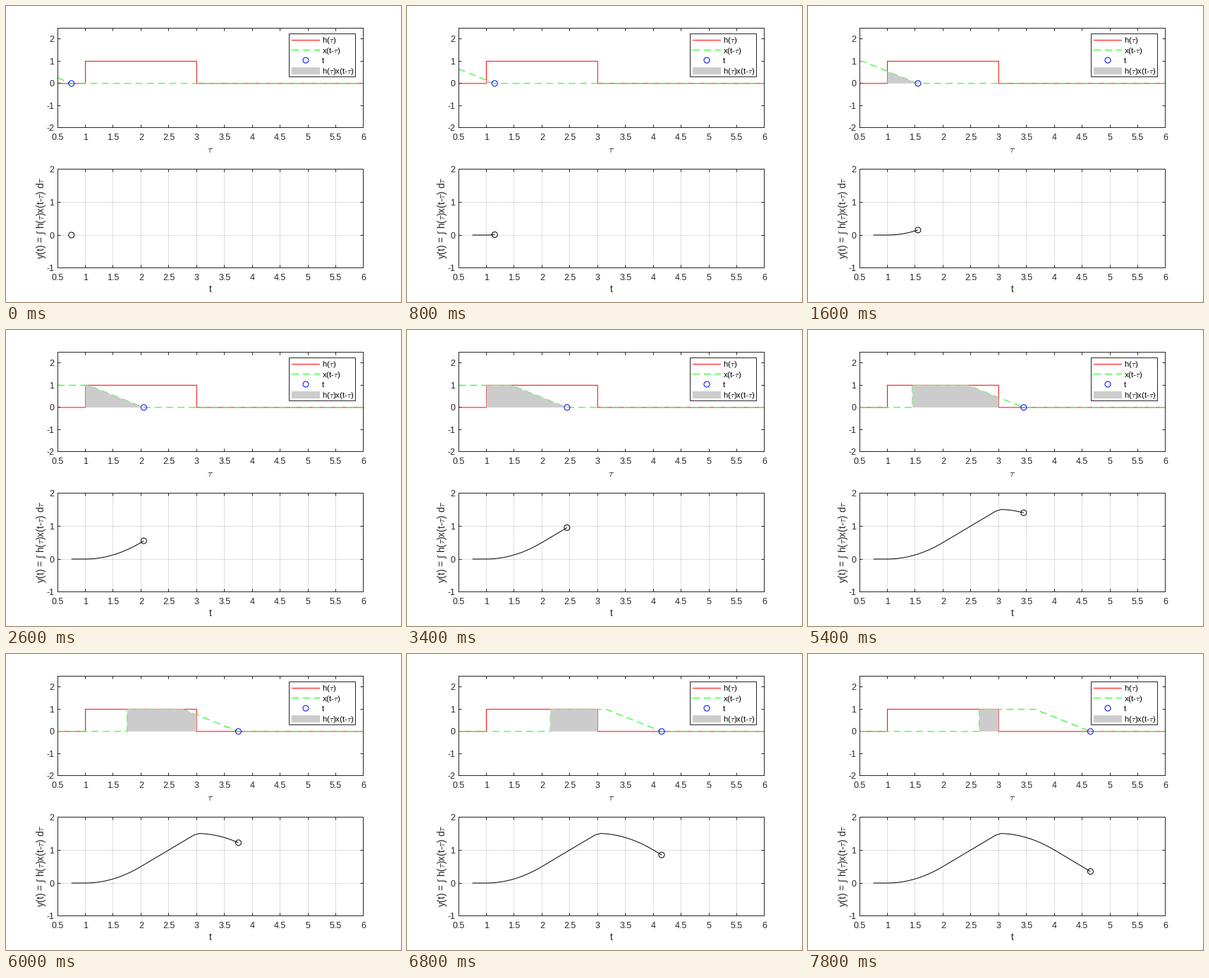
These frames come from a looping animation (560 px wide and 420 px high, 8000 ms). A matplotlib script:

```python
import numpy as np
import matplotlib.pyplot as plt
from matplotlib.animation import FuncAnimation
from matplotlib.patches import Circle, Rectangle
from matplotlib.patheffects import Normal, Stroke
from matplotlib.transforms import Affine2D

W, H = 560, 420
FRAMES, STEP_MS = 40, 200
T0, DT = 0.75, 0.1
LOW, HIGH, EPS = 0.5, 6, 1e-4
LEFT, RIGHT = 72.55, 506.45
INK = "#262626"
RED, GREEN, BLUE, GREY = "#ff0000", "#00ff00", "#0000ff", "#cccccc"
DASH = (0, (10, 6))

plt.rcParams.update({"font.family": "Liberation Sans",
                     "mathtext.fontset": "cm"})


def pulse(tau):
    return ((tau >= 1) & (tau <= 3)).astype(float)


def x_signal(s):
    """Unit ramp followed by a unit plateau ending at s = 2."""
    s = np.round(s, 6)
    return np.where((s >= 0) & (s <= 2), np.minimum(s, 1), 0)


def x_integral(s):
    s = np.clip(s, 0, 2)
    return np.where(s < 1, s * s / 2, s - 0.5)


def knots(t):
    """Every tau at which one of the two signals bends or jumps."""
    tau = np.array([LOW, HIGH, 1 - EPS, 1, 3, 3 + EPS,
                    t - 2 - EPS, t - 2, t - 1, t])
    return np.unique(np.clip(tau, LOW, HIGH))


times = T0 + DT * np.arange(FRAMES)
output = x_integral(times - 1) - x_integral(times - 3)

fig = plt.figure(figsize=(W / 72, H / 72), dpi=72, facecolor="white")


def add_plot(top, bottom, ylim, yticks):
    ax = fig.add_axes([LEFT / W, 1 - bottom / H,
                       (RIGHT - LEFT) / W, (bottom - top) / H])
    ax.set_xlim(LOW, HIGH)
    ax.set_ylim(*ylim)
    ax.set_xticks(np.arange(0.5, 6.1, 0.5))
    ax.set_yticks(yticks)
    ax.tick_params(direction="in", length=4, width=1, color=INK, top=True,
                   right=True, labelbottom=False, labelleft=False)
    for spine in ax.spines.values():
        spine.set(color=INK, linewidth=1)
    ax.set_axisbelow(True)
    # Rules snap to whole pixels; data sits half a pixel further in
    return ax, ax.transData + Affine2D().translate(0.5, -0.5)


upper, upper_data = add_plot(30.55, 172.45, (-2, 2.5), range(-2, 3))
lower, lower_data = add_plot(230.6, 371.46, (-1, 2), range(-1, 3))
lower.grid(True, color=INK, alpha=0.15, linewidth=1)

# Overlay in pixel coordinates for the text, the legend and the rings
page = fig.add_axes([0, 0, 1, 1])
page.set_xlim(0, W)
page.set_ylim(H, 0)
page.axis("off")


def to_page(transform, x, y):
    px, py = transform.transform((x, y))
    return px, H - py


def put(x, y, s, size=12.5, ha="center", color=INK, **kw):
    page.text(x, y, s, fontsize=size, ha=ha, va="baseline", color=color, **kw)


def line(ax, transform, x, y, color, **kw):
    return ax.plot(x, y, color=color, lw=1, snap=False, transform=transform,
                   solid_capstyle="butt", **kw)[0]


def ring(color, center=(0, 0)):
    return page.add_patch(Circle(center, 4, fill=False, ec=color, lw=1))


def label_ticks(ax, transform):
    low = ax.get_ylim()[0]
    for v in ax.get_xticks():
        x, y = to_page(transform, v, low)
        put(x, y + 17.5, f"{v:g}")
    for v in ax.get_yticks():
        y = to_page(transform, LOW, v)[1]
        put(68.5, y + 4.5, f"{v:g}", ha="right")


label_ticks(upper, upper_data)
label_ticks(lower, lower_data)
put(290, 207.5, r"$\tau$", 14)
put(290, 406.5, "t", 13.7)
put(54, 301, r"y(t) = ∫ h($\tau$)x(t-$\tau$) d$\tau$", 13.7,
    rotation=90, rotation_mode="anchor")

# Legend
page.add_patch(Rectangle((401, 39), 94.4, 61, fc="white", ec=INK, lw=1))
line(page, page.transData, [405, 445], [48.5, 48.5], RED)
line(page, page.transData, [405, 445], [62.5, 62.5], GREEN, ls=DASH)
ring(BLUE, (425, 77))
page.add_patch(Rectangle((405, 87), 40, 10, fc=GREY, ec="none"))
names = [r"h($\tau$)", r"x(t-$\tau$)", "t", r"h($\tau$)x(t-$\tau$)"]
for row, name in enumerate(names):
    put(447.7, 52.4 + 14.5 * row, name, 11.4, ha="left", color="black")

# Moving parts
base = knots(T0)
line(upper, upper_data, base, pulse(base), RED)
shifted = line(upper, upper_data, [], [], GREEN, ls=DASH)
shifted.set_path_effects([Stroke(foreground="white"), Normal()])
area, = upper.fill(base, 0 * base, fc=GREY, ec="none", zorder=3,
                   transform=upper_data)
trace = line(lower, lower_data, [], [], "black")
now, tip = ring(BLUE), ring("black")


def draw(i):
    t = times[i]
    tau = knots(t)
    x = x_signal(t - tau)
    shifted.set_data(tau, x)
    area.set_xy(np.column_stack([np.r_[tau, tau[::-1]],
                                 np.r_[pulse(tau) * x, 0 * tau]]))
    trace.set_data(times[:i + 1], output[:i + 1])
    now.center = to_page(upper_data, t, 0)
    tip.center = to_page(lower_data, t, output[i])
    return shifted, area, trace, now, tip


anim = FuncAnimation(fig, draw, frames=FRAMES, interval=STEP_MS,
                     repeat=True, repeat_delay=0, blit=False)
plt.show()
```
